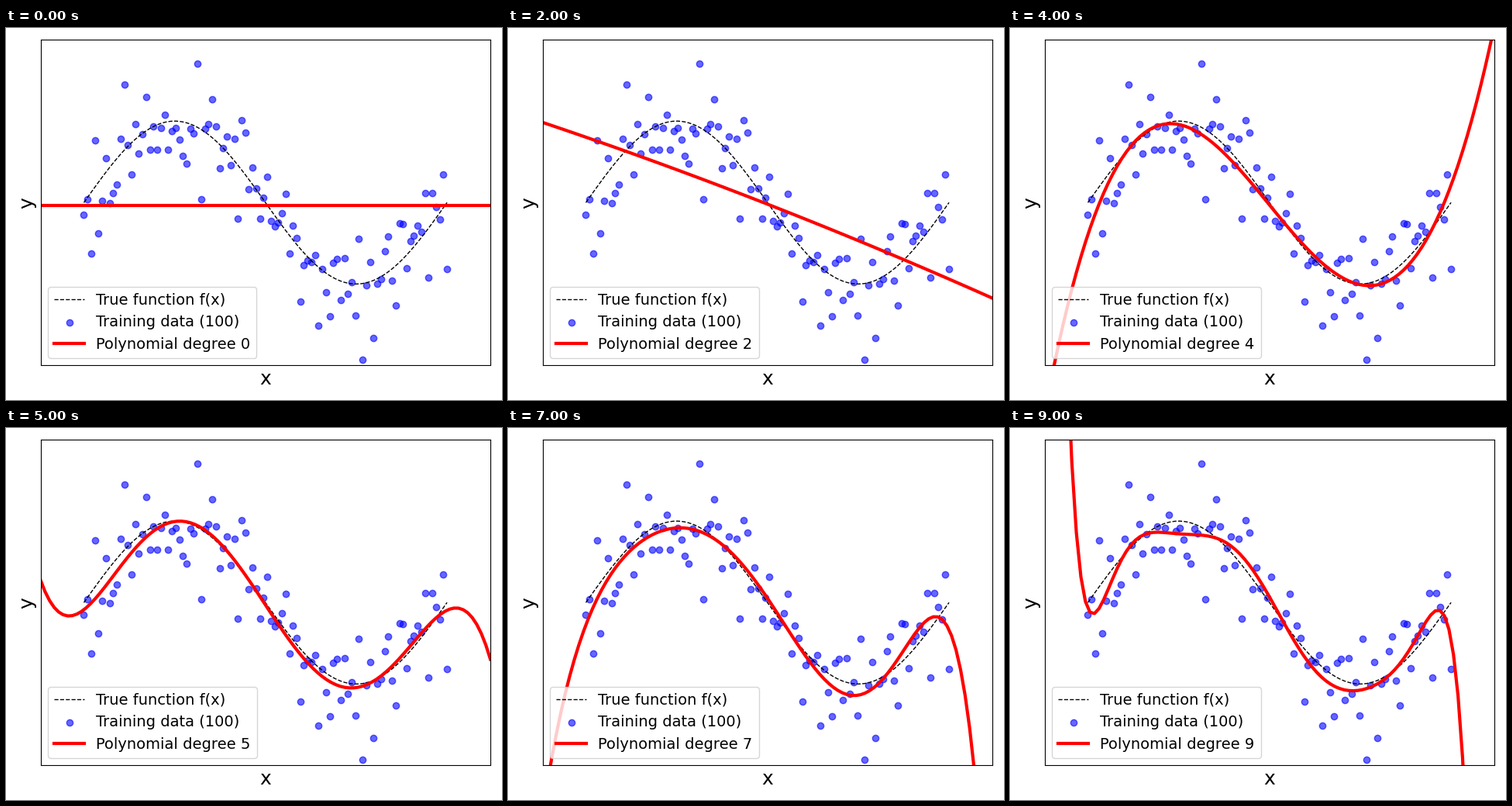
A matplotlib script for the animation above (10 s loop, 640 px wide and 480 px high).

```python
import numpy as np
import matplotlib.pyplot as plt
from matplotlib.animation import FuncAnimation
from numpy.polynomial import Polynomial

DEGREES = 10
MARGIN = 0.75

rng = np.random.RandomState(2)
x = np.linspace(0, 2 * np.pi, 100)
y_true = np.sin(x)
y = y_true + 0.35 * rng.randn(x.size)

x_fit = np.linspace(x[0] - MARGIN, x[-1] + MARGIN, 100)
fits = [Polynomial.fit(x, y, degree)(x_fit) for degree in range(DEGREES)]

fig, ax = plt.subplots(figsize=(6.4, 4.8), dpi=100)
ax.plot(x, y_true, color="black", ls="--", lw=1, label="True function f(x)")
ax.scatter(x, y, color="blue", alpha=0.6, label=f"Training data ({x.size})")
fit_line, = ax.plot(x_fit, fits[0], color="red", lw=3,
                    label="Polynomial degree 0")

ax.set_xlim(x_fit[0], x_fit[-1])
ax.set_ylim(-2, 2)
ax.set_xticks([])
ax.set_yticks([])
ax.set_xlabel("x", fontsize=18)
ax.set_ylabel("y", fontsize=18)
legend = ax.legend(loc="lower left", fontsize=14)
fit_label = legend.get_texts()[2]
fig.tight_layout()


def update(degree):
    fit_line.set_ydata(fits[degree])
    fit_label.set_text(f"Polynomial degree {degree}")
    return fit_line, legend


anim = FuncAnimation(fig, update, frames=DEGREES, interval=1000,
                     repeat=True, repeat_delay=0)
plt.show()
```
